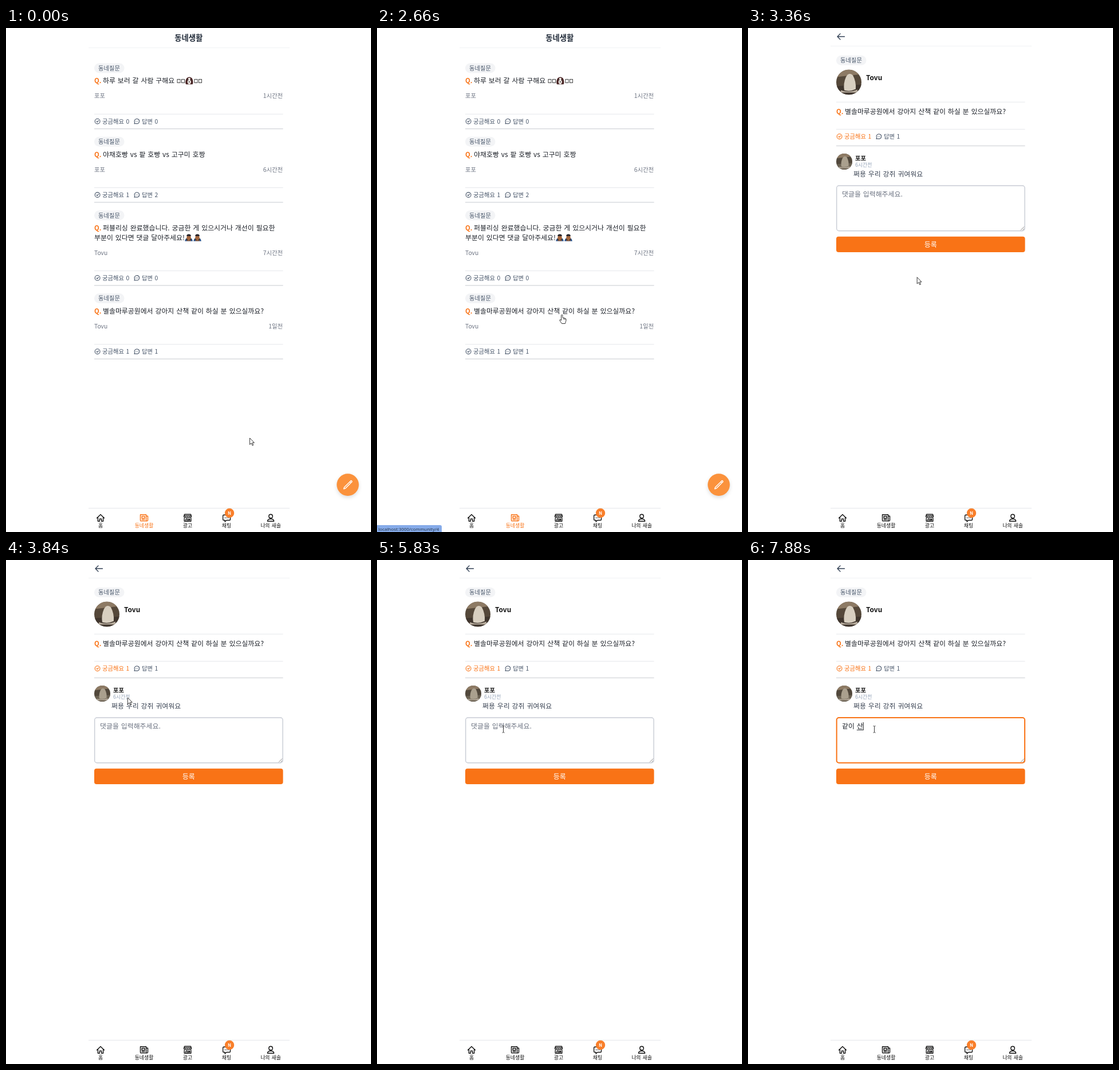
These frames come from a looping animation (637 px wide and 879 px high, 8 s). An HTML page:

```html
<!DOCTYPE html>
<html lang="ko">
<head>
<meta charset="utf-8">
<style>
html, body { margin: 0; width: 100%; height: 100%; overflow: hidden; background: #fff; }
svg { display: block; width: 637px; height: 879px; }
text { font-family: "Noto Sans CJK KR", "Noto Sans CJK", "Noto Sans CJK JP", sans-serif; white-space: pre; word-spacing: .6px; }
.icon { fill: none; stroke: currentColor; stroke-linecap: round; stroke-linejoin: round; }
</style>
</head>
<body>
<svg id="stage" viewBox="0 0 637 879"></svg>
<script>
const BODY = 11.9, SMALL = 10.3, TINY = 8.9;
const ORANGE = '#f97316', INK = '#1c2028', GRAY = '#6b7280', SLATE = '#475569';

// Text placed by its vertical centre
const text = (x, y, str, size, fill, attrs = '') =>
  `<text x="${x}" y="${y + size * .37}" font-size="${size}" fill="${fill}" ${attrs}>${str}</text>`;
const line = (y, color, width = 1, x1 = 154, x2 = 483.5) =>
  `<path d="M${x1} ${y}H${x2}" stroke="${color}" stroke-width="${width}"/>`;
const icon = (x, y, d, color = 'currentColor', width = 1.1) =>
  `<path class="icon" transform="translate(${x} ${y})" d="${d}" style="stroke:${color}" stroke-width="${width}"/>`;
const circle = (x, y, r, fill) => `<circle cx="${x}" cy="${y}" r="${r}" fill="${fill}"/>`;
const END = 'text-anchor="end"', MID = 'text-anchor="middle"', BOLD = 'font-weight="700"';

const tag = y => `<rect x="154" y="${y - 8.5}" width="52.5" height="17" rx="8.5" fill="#f3f4f6"/>`
  + text(161, y, '동네질문', SMALL, SLATE);
const question = (y, str) => text(154, y, 'Q.', 11.4, ORANGE, BOLD) + text(169, y, str, BODY, INK);
const likes = (y, n, color) =>
  icon(159.6, y - .3, 'M4.4 0A4.4 4.4 0 1 1-4.4 0A4.4 4.4 0 1 1 4.4 0M-1.7 .2L-.4 1.5L1.9-1.3', color)
  + text(168, y, '궁금해요 ' + n, SMALL, color);
const replies = (y, n) =>
  icon(228.3, y - .3, 'M-4.3 4.3L-3.7 2A4.4 4.2 0 1 1-1.6 3.8ZM-2 0h.1M0 0h.1M2 0h.1', SLATE)
  + text(237, y, '답변 ' + n, SMALL, SLATE);

const tofu = x => `<rect x="${x}" y="89.5" width="5" height="6" fill="none" stroke="#333" stroke-width=".9"/>`;
const dog = `<path d="M319.8 85.4Q325 85.5 326.3 91T325.6 98.4H314Q312-1 313.3 91T319.8 85.4Z" fill="none"/>
  <path d="M319.8 85.4Q325 85.5 326 91T325.4 98.3H314.2Q312.4 96 313.6 91T319.8 85.4Z" fill="#4a2626"/>
  <path d="M318.3 87h3l1.6 6.5q0 4.4-3.1 4.4t-3.1-4.4z" fill="#f2ece8"/>
  <path d="M317.8 90.6h.2M321.7 90.6h.2M319.3 94h1" stroke="#222" stroke-width="1.6" stroke-linecap="round"/>`
  .replace(/<path[^>]*fill="none"\/>\s*/, '');
const guard = x => `<g transform="translate(${x} 365.5)"><path d="M-6.8 6.3Q-6 0 0 0T6.8 6.3Z" fill="#26518c"/>
  <path d="M-3.5 6Q-5-5 0-5T3.5 6Z" fill="#a4673f"/><path d="M-3.8-2.4Q-4-6 0-6T3.8-2.4Z" fill="#29262c"/>
  <path d="M-4.4 3l3 1.4M4.4 3l-3 1.4" stroke="#333" stroke-width="1.6"/></g>`;

function card(top, title, author, age, likeCount, replyCount, second = '') {
  const low = top + (second ? 16.5 : 0);
  return tag(top + 70) + question(top + 92, title)
    + (second && text(154, top + 108.5, second, BODY, INK))
    + text(154, low + 118.5, author, SMALL, GRAY) + text(483, low + 118.5, age, SMALL, GRAY, END)
    + line(low + 150.2, '#e5e7eb') + likes(low + 163, likeCount, SLATE) + replies(low + 163, replyCount)
    + line(low + 175.8, '#d9dbdf', 1.5);
}

const walk = '별솔마루공원에서 강아지 산책 같이 하실 분 있으실까요?';
const listPage = text(318.7, 17, '동네생활', 13.3, '#1f2937', MID + BOLD)
  + line(34.5, '#f1f2f4', 1, 144, 495)
  + card(0, '하루 보러 갈 사람 구해요', '포포', '1시간전', 0, 0)
  + [299, 306.5, 329, 336.5].map(tofu).join('') + dog
  + card(128.3, '야채호빵 vs 팥 호빵 vs 고구미 호짱', '포포', '6시간전', 1, 2)
  + card(256.7, '퍼블리싱 완료했습니다. 궁금한 게 있으시거나 개선이 필요한', 'Tovu', '7시간전', 0, 0,
    '부분이 있다면 댓글 달아주세요!')
  + guard(319) + guard(334)
  + card(401.5, walk, 'Tovu', '1일전', 1, 1)
  + `<g style="filter:drop-shadow(0 3px 3px #0002)">${circle(596.5, 796.6, 19.3, '#fb923c')}</g>`
  + `<g transform="translate(596.5 796.8) scale(.72) translate(-12 -12)">${icon(0, 0,
    'M16.9 4.5l1.7-1.7a1.9 1.9 0 1 1 2.6 2.6L6.8 19.8a4.5 4.5 0 0 1-1.9 1.1l-2.7.8.8-2.7a4.5 4.5 0 0 1 1.1-1.9ZM16.9 4.5l2.6 2.6', '#fff', 2)}</g>`;

// Round photo reduced to flat tones
const avatar = (x, y, r, wall, floor, fur) => `<svg x="${x - r}" y="${y - r}" width="${2 * r}" height="${2 * r}" viewBox="0 0 44 44" style="width:${2 * r}px;height:${2 * r}px">
  <clipPath id="round${r}"><circle cx="22" cy="22" r="22"/></clipPath><g clip-path="url(#round${r})">
  <path d="M0 0H44V44H0Z" fill="${wall}"/><path d="M0 0H44V8L0 13Z" fill="#8d7a64"/>
  <path d="M0 29L44 26V44H0Z" fill="${floor}"/><path d="M14 36Q12 24 17 13Q22 4 29 10Q35 21 34 34Q24 39 14 36Z" fill="${fur}"/>
  <path d="M8 36Q22 41 37 35V40H8Z" fill="#b9ae9f"/></g></svg>`;

const detailPage = icon(162, 15, 'M6.5 0H-6M-1-5L-6 0L-1 5', '#334155', 1.4)
  + line(31.5, '#f1f2f4', 1, 144, 495) + tag(56.5)
  + avatar(176, 94.5, 22, '#55483a', '#40362e', '#d8cfc0') + text(206, 87, 'Tovu', BODY, '#111', BOLD)
  + line(129.2, '#e5e7eb') + question(146, walk) + line(176.7, '#e5e7eb')
  + '<g id="liked">' + likes(189.5, 1, ORANGE) + '</g><g id="unliked">' + likes(189.5, 0, SLATE) + '</g>'
  + replies(189.5, 1) + line(205.4, '#d9dbdf', 1.5)
  + avatar(168, 233, 14, '#51483c', '#6b6253', '#aaa08e')
  + text(187, 227, '포포', SMALL, '#111', BOLD) + text(187, 239, '6시간전', TINY, '#94a3b8')
  + text(184, 255, '쩌용 우리 강쥐 귀여워요', BODY, '#374151')
  + '<rect id="field" x="154.7" y="275" width="328.3" height="78.7" rx="4" fill="#fff"/>'
  + '<path d="M476 352.5L482 346.5M479.5 352.5L482 350" stroke="#666" stroke-width=".8"/>'
  + text(164, 289.5, '댓글을 입력해주세요.', BODY, GRAY, 'id="hint"')
  + text(164, 289.5, '', BODY, INK, 'id="typed"')
  + `<path id="underline" stroke="${INK}" stroke-width=".9"/><path id="caret" stroke="#111"/>`
  + `<rect x="154" y="363.7" width="329.5" height="27.3" rx="4" fill="${ORANGE}"/>`
  + text(318.7, 377.5, '등록', BODY, '#fff', MID);

const navItems = [
  [165, '홈', 'M-6.5 .5L0-5.8L6.5.5M-4.6-1V6H-1.6V2H1.6V6H4.6V-1'],
  [241, '동네생활', 'M3.6 5.6H-5Q-6.5 5.6-6.5 4.1V-5.6H3.6V4.1Q3.6 5.6 5 5.6T6.5 4.1V-3H3.6M-3.8-2.8H1V1H-3.8ZM-3.8 3.2H1'],
  [317, '광고', 'M-5.5-6H5.5L6.6-2.2Q5.5.4 3.3-1.4Q1.5.6 0-1.4Q-1.5.6-3.3-1.4Q-5.5.4-6.6-2.2ZM-5.8.6V6H5.8V.6M-3 6V2H0V6M2 2H3.6V4H2ZM-6-3.5H6'],
  [385, '채팅', 'M-5-5H5Q6.4-5 6.4-3.6V3Q6.4 4.2 5 4.2H0L-3 6.6V4.2H-5Q-6.4 4.2-6.4 3V-3.6Q-6.4-5-5-5ZM-2.6 0h.1M0 0h.1M2.6 0h.1'],
  [462, '나의 새솔', 'M3.3-2.8A3.3 3.3 0 1 1-3.3-2.8A3.3 3.3 0 1 1 3.3-2.8M-5.6 6Q-5.6 2 0 2T5.6 6Z']
];
const nav = line(837.5, '#e5e7eb', 1, 144, 495)
  + navItems.map(([x, label, d], i) => `<g ${i === 1 ? 'id="activeTab"' : ''} color="#111">`
    + icon(x, 854.3, d, 'currentColor', 1.4) + text(x, 868, label, TINY, 'currentColor', MID) + '</g>').join('')
  + circle(390, 846, 8.2, '#f97f2a') + text(390, 846.2, 'N', 8, '#fff', MID + BOLD);

const status = '<g id="status"><path id="bar" fill="#86abe9"/>'
  + text(2.5, 874, 'localhost:3000/community/4', 7.9, '#263850', 'style="font-family:\'Noto Sans\',sans-serif"') + '</g>';
const cursor = `<g id="cursor" stroke="#222" stroke-width=".9" fill="#fff" stroke-linejoin="round">
  <path id="arrow" d="M.4 0V11.5L3.1 9L5 13.2L6.7 12.4L4.9 8.3H8.3Z"/>
  <path id="hand" d="M-1.2.8Q0-.9 1.2.8V5.2L5.6 6.3Q7.6 6.8 7.4 9L6.6 12.5L5.6 15.5H-.2L-3.8 10.3Q-4.4 8.5-2.8 8.7L-1.2 10ZM3.3 8.6V6M5.4 8.8V6.6"/>
  <path id="beam" fill="none" d="M-2-5.5H-.8L0-5L.8-5.5H2M0-5V5.5M-2 6H-.8L0 5.5L.8 6H2"/></g>`;

stage.innerHTML = `<g id="list">${listPage}</g><g id="detail">${detailPage}</g>${nav}${status}${cursor}`;

const $ = id => document.getElementById(id);
const show = (id, on) => $(id).setAttribute('display', on ? 'inline' : 'none');
const set = (id, attrs) => { for (const k in attrs) $(id).setAttribute(k, attrs[k]); };
const clamp = v => Math.max(0, Math.min(1, v));

const LOOP = 8000, OPEN = 2730, FOCUS = 5970;
const path = [ // time, x, y
  [0, 425, 715], [1380, 425, 715], [2070, 323, 500], [3200, 322.5, 500], [3840, 212, 240],
  [4530, 200, 189], [4670, 200, 189], [4800, 196.5, 201], [5130, 196.5, 201], [5220, 197, 190],
  [5420, 197, 190], [5830, 220.5, 295], [LOOP, 220.5, 295]
];
const typing = [ // time, finished text, syllable being composed
  [0, '', ''], [7090, '', 'ㄱ'], [7190, '', '가'], [7290, '', '같'], [7490, '같', 'ㅇ'], [7570, '같', '이'],
  [7650, '같이 ', ''], [7730, '같이 ', 'ㅅ'], [7800, '같이 ', '사'], [7880, '같이 ', '산']
];

function pointerAt(t) {
  const i = path.findIndex(p => p[0] > t);
  const [t0, x0, y0] = path[i - 1], [t1, x1, y1] = path[i];
  const k = (t - t0) / (t1 - t0);
  return [x0 + (x1 - x0) * k, y0 + (y1 - y0) * k];
}

function drawField(t) {
  const focused = t >= FOCUS;
  set('field', { stroke: focused ? ORANGE : '#c8ccd5', 'stroke-width': focused ? 2 : 1.4 });
  const [, done, composing] = typing.findLast(s => s[0] <= t);
  const typed = $('typed');
  typed.textContent = done;
  const start = 164 + (done ? typed.getComputedTextLength() : 0);
  typed.textContent = done + composing;
  const end = 164 + (done + composing ? typed.getComputedTextLength() : 0);
  show('hint', !(done + composing));
  show('underline', composing);
  set('underline', { d: `M${start} 296.5H${end}` });
  show('caret', focused && (t < 6500 || t >= 6960));
  set('caret', { d: `M${end + .4} 283V297` });
}

function draw(t) {
  const onList = t < OPEN;
  show('list', onList);
  show('detail', !onList);
  set('activeTab', { color: onList ? ORANGE : '#111' });
  const liked = t < 4670 || t >= 5350;
  show('liked', liked);
  show('unliked', !liked);
  drawField(t);

  set('bar', { d: `M0 867H${onList ? 110 : 208}q3 0 3 3V879H0Z` });
  set('status', { opacity: clamp((t - 1900) / 120) * clamp((3210 - t) / 220) });

  const [x, y] = pointerAt(t);
  const inside = (left, top, right, bottom) => x > left && x < right && y > top && y < bottom;
  const beam = !onList && inside(154, 275, 484, 354);
  const hand = onList ? inside(154, 55, 484, 577) : inside(154, 183, 216, 197) || inside(154, 364, 484, 391);
  show('beam', beam);
  show('hand', hand);
  show('arrow', !beam && !hand);
  set('cursor', { transform: `translate(${x} ${y})` });
}

const begin = performance.now();
(function tick() {
  draw((performance.now() - begin) % LOOP);
  requestAnimationFrame(tick);
})();
</script>
</body>
</html>
```
